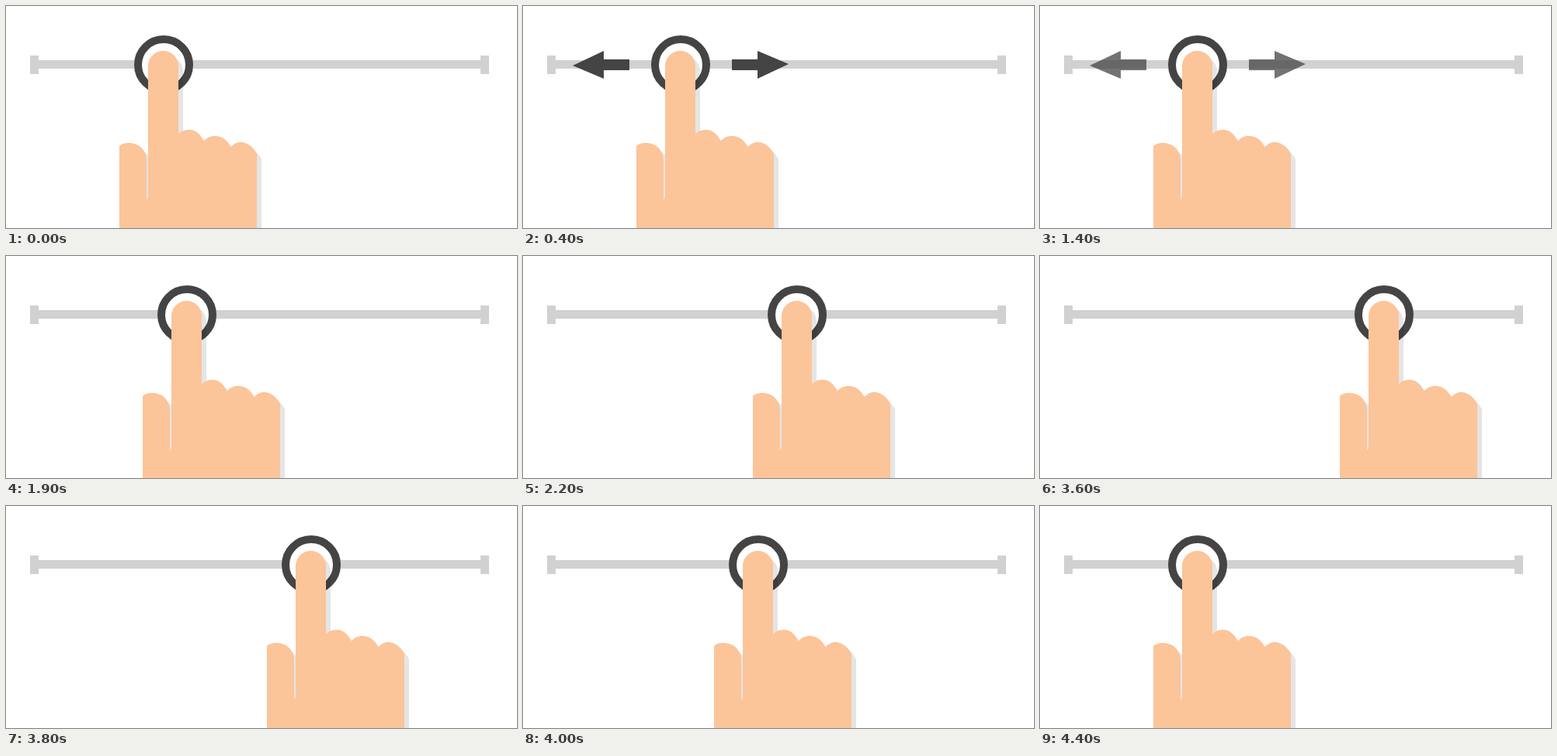
Recreate the animation shown at these times as an HTML page. Size 658 by 287 pixels, loop 5.4 s.

```html
<!DOCTYPE html>
<html lang="en">
<head>
<meta charset="utf-8">
<title>Slider drag</title>
<style>
  html, body { margin: 0; width: 100%; height: 100%; overflow: hidden; background: #fff; }
  svg { display: block; }
  .track { fill: #d1d1d1; }
  .arrows { fill: #444; opacity: 0; }
  .knob { fill: #fff; stroke: #444; stroke-width: 10; }
  .skin { fill: #fcc499; }
  .shadow { fill: #000; opacity: .1; }
</style>
</head>
<body>
<svg width="658" height="287" viewBox="0 0 658 287">
  <defs>
    <g id="hand">
      <path d="M146 300V181C149 178 153 177 158 177C171 177 181 186 181 200V251Q183 249 183 246
        V77.5A19.5 19.5 0 0 1 222 77.5V166C225 162 230 160 236 160C244 160 251 166 254.500 175
        C258 170.500 263 168 269 168C278 168 286 174 289.500 182.500C293 178.500 297 176 302.500 176
        C311 176 319 183 323 191V300Z"/>
    </g>
  </defs>
  <path class="track" d="M31 64H42V70H611V64H622V88H611V81H42V88H31Z"/>
  <g class="arrows" id="arrows">
    <path d="M64 77L104 58V69H137V83H104V94Z"/>
    <path d="M342 75L302 94V83H269V69H302V58Z"/>
  </g>
  <g id="grip">
    <circle class="knob" cx="203" cy="76" r="33"/>
    <use class="shadow" href="#hand" x="6" y="7"/>
    <use class="skin" href="#hand"/>
  </g>
</svg>
<script>
  const STEP = 100, STEPS = 54;
  const arrows = document.getElementById('arrows');
  const grip = document.getElementById('grip');
  const clamp = (v, max) => Math.min(Math.max(v, 0), max);

  // Speeds up by 10px per step to the middle, then slows down again: 250px in 9 steps.
  function travel(step) {
    const k = clamp(step, 9);
    return k <= 5 ? 5 * k * (k + 1) : 250 - 5 * (9 - k) * (10 - k);
  }

  const fade = step => clamp(step / 4, 1);

  function draw(ms) {
    const n = Math.floor(ms / STEP + 1e-3) % STEPS;
    arrows.style.opacity = fade(n) - fade(n - 13);
    grip.setAttribute('transform', `translate(${travel(n - 17) - travel(n - 35)} 0)`);
  }

  const start = performance.now();
  function tick() {
    draw(performance.now() - start);
    requestAnimationFrame(tick);
  }
  tick();
</script>
</body>
</html>
```
